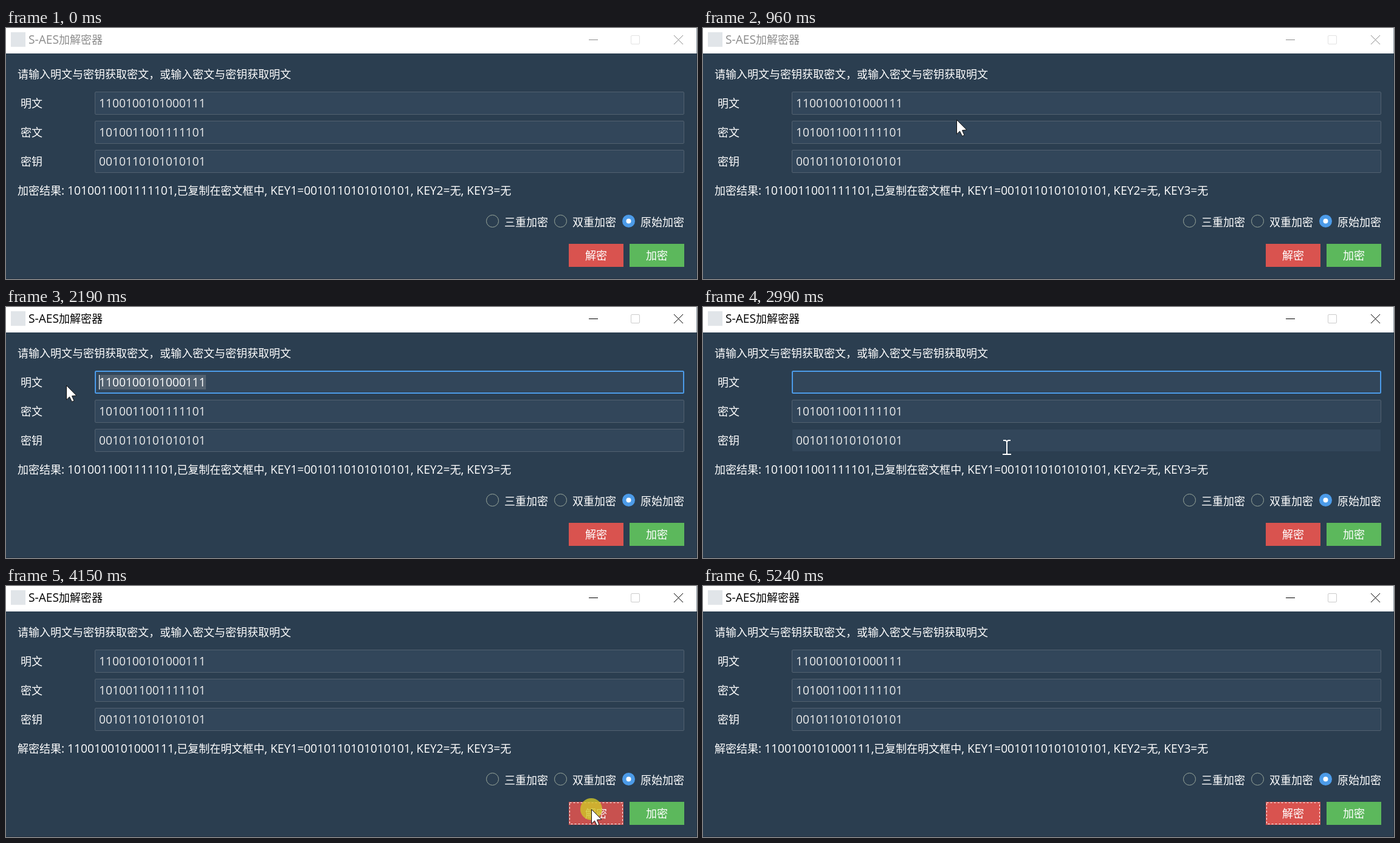
An HTML page with a canvas for the animation above (6170 ms loop, 1137 by 414 pixels).

```html
<!DOCTYPE html>
<html lang="zh-CN">
<head>
<meta charset="utf-8">
<title>S-AES加解密器</title>
<style>
  html, body { margin: 0; width: 100%; height: 100%; overflow: hidden; background: #2b3e50; }
  canvas { display: block; }
</style>
</head>
<body>
<canvas id="stage" width="1137" height="414"></canvas>
<script>
const ctx = document.getElementById('stage').getContext('2d');
const LOOP = 6170, TICK = 70, DIGIT = 11, TEXT_X = 153;
const PLAIN = '1100100101000111', CIPHER = '1010011001111101', KEY = '0010110101010101';
const BG = '#2b3e50', INPUT = '#32465a', BLUE = '#4c9be8', BORDER = '#526170', EDGE = '#223140';

// Moments of the recorded session, in ms
const ENTER = 260, FOCUS = 1290, DRAG_END = 1580, DRAG_RELEASE = 1780, ERASE = 2390;
const PRESS = 4020, RESULT = 4150, RELEASE = 4220, LEAVE = 5240;

const field = i => ({ x: 146, y: 105 + 48 * i, w: 970, h: 38 });
const buttonBox = x => ({ x, y: 356, w: 90, h: 38 });
const DECRYPT = buttonBox(926), ENCRYPT = buttonBox(1026);

const linear = k => k;
const easeOut = k => 1 - (1 - k) ** 2;
const overshoot = k => 1 + 2.7 * (k - 1) ** 3 + 1.7 * (k - 1) ** 2;

const ENTRY_POINT = { x: 880, y: 366 };
const glides = [
  { from: ENTER, to: 960, x: 417, y: 151, ease: easeOut },
  { from: 960, to: 1300, x: 335, y: 126 },
  { from: 1300, to: DRAG_END, x: 111, y: 134 },
  { from: 1710, to: 1920, x: 99, y: 129 },
  { from: 2920, to: 3550, x: 993, y: 358, ease: overshoot },
  { from: 3610, to: 3820, x: 963, y: 368 },
  { from: 4550, to: 4620, x: 950, y: 374 },
  { from: 4620, to: 4760, x: 676, y: 302 },
  { from: 4960, to: 5170, x: 869, y: 377 }
];

const during = (t, from, to) => t >= from && t < to;
const inside = (p, b) => p && p.x >= b.x && p.x < b.x + b.w && p.y >= b.y && p.y < b.y + b.h;

function pointerAt(t) {
  if (!during(t, ENTER, LEAVE)) return null;
  let { x, y } = ENTRY_POINT;
  for (const g of glides) {
    if (t < g.from) break;
    const elapsed = Math.floor((t - g.from) / TICK) * TICK;
    const k = t >= g.to ? 1 : (g.ease || linear)(elapsed / (g.to - g.from));
    x += (g.x - x) * k;
    y += (g.y - y) * k;
  }
  return { x: Math.round(x), y: Math.round(y) };
}

function rect(color, x, y, w, h) {
  ctx.fillStyle = color;
  ctx.fillRect(x, y, w, h);
}

function line(color, width, ...points) {
  ctx.strokeStyle = color;
  ctx.lineWidth = width;
  ctx.beginPath();
  points.forEach(([x, y]) => ctx.lineTo(x, y));
  ctx.stroke();
}

function frameBox(color, { x, y, w, h }, inset, width = 1) {
  ctx.strokeStyle = color;
  ctx.lineWidth = width;
  ctx.beginPath();
  ctx.roundRect(x + inset, y + inset, w - 2 * inset, h - 2 * inset, width > 1 || inset < 1 ? 1.5 : 0);
  ctx.stroke();
}

function disc(x, y, r, fill, stroke) {
  ctx.beginPath();
  ctx.arc(x, y, r, 0, Math.PI * 2);
  if (fill) { ctx.fillStyle = fill; ctx.fill(); }
  if (stroke) { ctx.strokeStyle = stroke; ctx.lineWidth = 1; ctx.stroke(); }
}

// Latin runs are set slightly larger than Chinese runs.
function text(str, x, y, color = '#fff') {
  ctx.fillStyle = color;
  for (const run of str.match(/[\x00-\x7f]+|[^\x00-\x7f]+/g) || []) {
    ctx.font = run.charCodeAt(0) < 128
      ? '19.2px "Open Sans", "Noto Sans", sans-serif'
      : '18px "Noto Sans CJK SC", "Noto Sans CJK", sans-serif';
    ctx.fillText(run, x, y);
    x += ctx.measureText(run).width;
  }
}

function titleBar(active) {
  const ink = active ? '#000' : '#8c8c8c';
  rect('#fff', 0, 0, 1137, 42);
  rect('#e1e5e9', 8, 7, 24, 24);
  text('S-AES加解密器', 37, 26, ink);
  rect(ink, 959, 19, 15, 1);
  frameBox(active ? '#ccc' : '#e2e2e2', { x: 1028, y: 12, w: 15, h: 15 }, .5);
  line(ink, 1, [1099, 12], [1114, 27]);
  line(ink, 1, [1114, 12], [1099, 27]);
}

function entry(box, value, focused, hovered) {
  rect(INPUT, box.x + 1, box.y + 1, box.w - 2, box.h - 2);
  if (focused) frameBox(BLUE, box, 1, 2);
  else frameBox(hovered ? BG : BORDER, box, .5);
  text(value, TEXT_X, box.y + 26, '#ebebeb');
}

function selection(start) {
  const x = TEXT_X + start * DIGIT;
  const selected = PLAIN.slice(start);
  rect(BORDER, x, 112, selected.length * DIGIT, 24);
  text(selected, x, 131);
}

function radio(x, label, on) {
  if (on) {
    disc(x, 318.5, 10.5, BLUE);
    disc(x, 318.5, 4, '#fff');
  } else {
    disc(x, 318.5, 10, null, '#9aa89c');
  }
  text(label, x + 19.5, 327);
}

function button(box, label, color, ring) {
  rect(color, box.x, box.y, box.w, box.h);
  text(label, box.x + 27, box.y + 26);
  if (!ring) return;
  ctx.setLineDash([3, 3]);
  frameBox('#fff', box, 1.5);
  ctx.setLineDash([]);
}

function arrow({ x, y }) {
  ctx.beginPath();
  [[.5, .5], [.5, 24], [5.5, 19.2], [9.5, 27.3], [13, 25.7], [9.5, 17.8], [16.8, 17]]
    .forEach(([dx, dy]) => ctx.lineTo(x + dx, y + dy));
  ctx.closePath();
  ctx.fillStyle = '#fff';
  ctx.fill();
  ctx.strokeStyle = '#111';
  ctx.lineWidth = 1;
  ctx.stroke();
}

function beam({ x, y }) {
  const cx = x + 1;
  rect('#fff', cx - 1, y - 9, 2, 21);
  line('#fff', 2, [cx - 6, y - 11], [cx - 2, y - 11], [cx, y - 9], [cx + 2, y - 11], [cx + 6, y - 11]);
  line('#fff', 2, [cx - 7, y + 12], [cx + 7, y + 12]);
}

// Caret index follows the drag and stays at the start afterwards.
function caretIndex(t, p) {
  if (t >= DRAG_END) return 0;
  return Math.max(0, Math.min(PLAIN.length, Math.ceil((p.x + 14 - TEXT_X) / DIGIT)));
}

function editing(t, p) {
  const start = caretIndex(t, p);
  if (t < ERASE) selection(start);
  const blinkOn = (t - FOCUS) % 900 < 600;
  if (blinkOn) rect('#fff', TEXT_X + start * DIGIT, 112, 1, 24);
}

function draw(t) {
  const p = pointerAt(t);
  const focused = during(t, FOCUS, PRESS);
  const decrypted = t >= RESULT;
  const overEntry = [0, 1, 2].some(i => inside(p, field(i)));

  rect(BG, 0, 0, 1137, 414);
  titleBar(t >= FOCUS);
  rect('#8a969f', 1136, 0, 1, 42);
  rect(EDGE, 1136, 42, 1, 372);
  rect(EDGE, 0, 413, 1137, 1);

  text('请输入明文与密钥获取密文，或输入密文与密钥获取明文', 19, 83);
  const values = [during(t, ERASE, RESULT) ? '' : PLAIN, CIPHER, KEY];
  ['明文', '密文', '密钥'].forEach((label, i) => {
    const box = field(i);
    text(label, 24, box.y + 26);
    entry(box, values[i], i === 0 && focused, inside(p, box));
  });
  if (focused) editing(t, p);

  const [verb, result, target] = decrypted ? ['解密', PLAIN, '明文'] : ['加密', CIPHER, '密文'];
  text(`${verb}结果: ${result},已复制在${target}框中, KEY1=${KEY}, KEY2=无, KEY3=无`, 19, 275);

  ['三重加密', '双重加密', '原始加密'].forEach((label, i) => radio(800.5 + 112 * i, label, i === 2));
  const red = during(t, PRESS, RESULT) ? '#b64f4f' : inside(p, DECRYPT) ? '#c8514f' : '#d9534f';
  button(DECRYPT, '解密', red, t >= PRESS);
  button(ENCRYPT, '加密', inside(p, ENCRYPT) ? '#57ac5b' : '#5cb85c');

  if (!p) return;
  if (during(t, FOCUS, DRAG_RELEASE) || during(t, PRESS, RELEASE))
    disc(p.x - (overEntry ? 2 : 0), p.y, 18, 'rgba(208,198,40,.8)');
  (overEntry ? beam : arrow)(p);
}

function frame(now) {
  draw(now % LOOP);
  requestAnimationFrame(frame);
}
requestAnimationFrame(frame);
</script>
</body>
</html>
```
